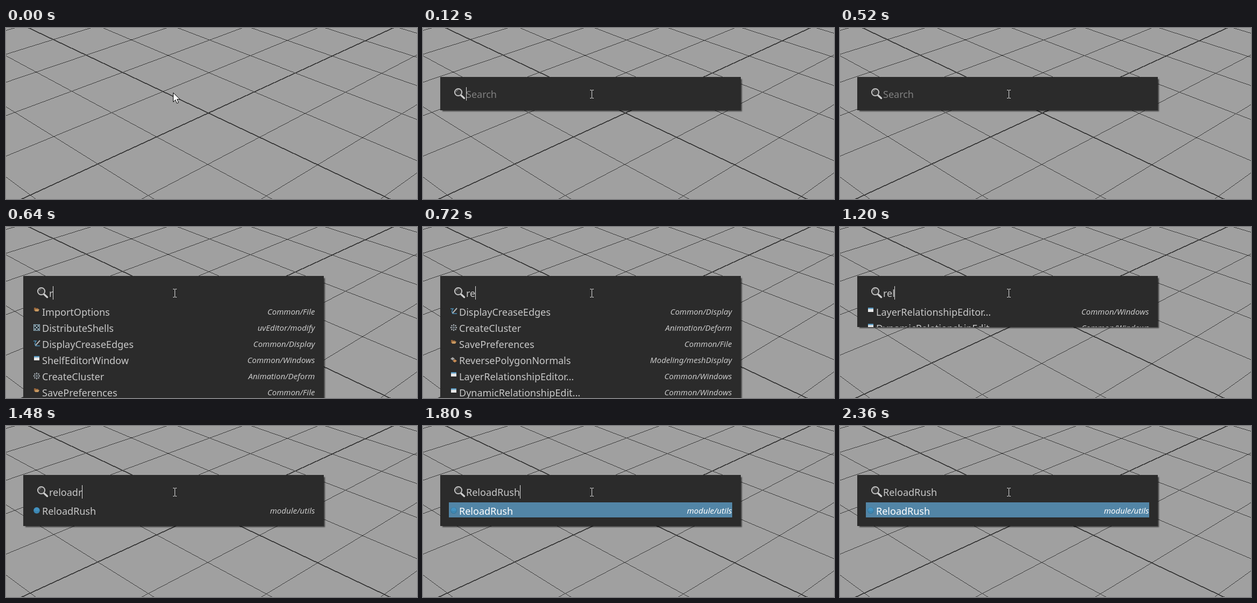
Write an HTML page that moves like this. It is 763x318 px and loops after 2400 ms.

```html
<!DOCTYPE html>
<html lang="en">
<head>
<meta charset="utf-8">
<title>Command search</title>
<style>
html, body { margin: 0; width: 100%; height: 100%; overflow: hidden; background: #a0a0a0; }
svg { position: absolute; left: 0; top: 0; display: block; }
#panel {
  position: absolute; left: 32px; top: 91px; width: 558px;
  background: #2b2b2b; box-shadow: 3px 3px 2px -1px rgba(0, 0, 0, .6);
}
#clip { position: absolute; inset: 0; overflow: hidden; }
text { font: 18px "Noto Sans", "Open Sans", sans-serif; fill: #c8c8c8; white-space: pre; }
text.path { font-size: 15px; font-style: italic; text-anchor: end; }
text.hint { fill: #808080; }
.on text { fill: #fff; }
.crisp { shape-rendering: crispEdges; }
</style>
</head>
<body>
<svg id="grid" class="crisp" width="763" height="318" fill="none"></svg>
<div id="panel"><div id="clip"><svg id="content" width="558" height="227" viewBox="32 91 558 227"></svg></div></div>
<svg id="pointer" width="763" height="318">
  <path id="arrow" d="M310.5 120.5v17l4-4 2.7 6.5 3-1.2-2.7-6.3h5.3z" fill="#fff" stroke="#000"/>
  <path id="beam" class="crisp" d="M310 115.5h3M314 115.5h3M313.5 116v14M310 130.5h3M314 130.5h3" stroke="#e0e0e0"/>
</svg>
<script>
const $ = id => document.getElementById(id);
const LOOP = 2400;

// Ground plane in perspective: world (u, v) to screen
function project(u, v) {
  const w = 1 - .06 * (u + v);
  const x = (376 + 66.7 * u - 112.9 * v) / w - .25;
  const y = (158 + 32.88 * u + 32.21 * v) / w + .16;
  return x.toFixed(2) + ' ' + y.toFixed(2);
}

function drawGrid() {
  const N = 6;
  let thin = '', axes = '';
  for (let i = -N; i <= N; i++) {
    const d = `M${project(i, -N)}L${project(i, N)}M${project(-N, i)}L${project(N, i)}`;
    if (i) thin += d; else axes += d;
  }
  // Widths give one and two pixels per column on the slanted lines
  $('grid').innerHTML =
    `<path d="${thin}" stroke="#333" stroke-width=".9"/><path d="${axes}" stroke="#383838" stroke-width="1.8"/>`;
}

// Row icons, drawn around the row's centre
const rect = (x, y, w, h, fill) => `<rect x="${x}" y="${y}" width="${w}" height="${h}" fill="${fill}"/>`;
const dot = (x, y, r, fill) => `<circle cx="${x}" cy="${y}" r="${r}" fill="${fill}"/>`;
const path = (d, attrs) => `<path d="${d}" ${attrs}/>`;

function ring() {
  let s = path('M-4 0H4M0-4V4', 'stroke="#8a97a0"');
  for (let i = 0; i < 8; i++) {
    const a = i * Math.PI / 4;
    s += dot((5 * Math.cos(a)).toFixed(1), (5 * Math.sin(a)).toFixed(1), 1.2, '#b4bcc2');
  }
  return s;
}

const icons = {
  folder: path('M-5-7h3l1 1h4v2l-1 3h-7z', 'fill="#94643a"') + path('M-3-4h8l-2 4h-6z', 'fill="#c99a62"'),
  shells: rect(-6, -6, 12, 12, '#9fc0d0') + rect(-5, -5, 10, 10, '#33424a') +
    [-3, 0, 3].map(x => [-3, 0, 3].map(y =>
      (x + y) % 2 ? '' : rect(x - 1, y - 1, 2, 2, '#d5e2e8')).join('')).join(''),
  crease: path('M-6-5h5q-4 5-1 9h8', 'fill="none" stroke="#4a8cb4" stroke-width="1.5"') +
    path('M6-6L-2 3', 'stroke="#b8b8b8" stroke-width="2"'),
  window: rect(-5, -7, 10, 8, '#e8e8e8') + rect(-5, -7, 10, 2.5, '#5b9cc4'),
  ring: ring(),
  flip: path('M-6-2l4-3 4 3-4 3z', 'fill="#a5a5a5"') + path('M-2 2l4-3 4 3-4 3z', 'fill="#c98d55"'),
  ball: dot(0, 0, 6, '#35789f') + dot(0, -.5, 5, '#4492c0') +
    path('M-4 1q4 3 8 0', 'fill="none" stroke="#35789f"')
};

const rows = {
  imp: ['folder', 'ImportOptions', 'Common/File'],
  dist: ['shells', 'DistributeShells', 'uvEditor/modify'],
  crease: ['crease', 'DisplayCreaseEdges', 'Common/Display'],
  shelf: ['window', 'ShelfEditorWindow', 'Common/Windows'],
  cluster: ['ring', 'CreateCluster', 'Animation/Deform'],
  prefs: ['folder', 'SavePreferences', 'Common/File'],
  normals: ['flip', 'ReversePolygonNormals', 'Modeling/meshDisplay'],
  layer: ['window', 'LayerRelationshipEditor...', 'Common/Windows'],
  dynamic: ['window', 'DynamicRelationshipEdit...', 'Common/Windows'],
  reload: ['ball', 'ReloadRush', 'module/utils']
};
const lists = {
  none: [],
  r: ['imp', 'dist', 'crease', 'shelf', 'cluster', 'prefs'],
  re: ['crease', 'cluster', 'prefs', 'normals', 'layer', 'dynamic'],
  rel: ['layer', 'dynamic', 'reload'],
  relo: ['reload']
};

// start, query, list, panel height, caret, highlight; the panel shrinks just before its text updates
const steps = [
  [0, '', 'none', 0, 0],
  [80, '', 'none', 62, 0],
  [120, '', 'none', 62, 1],
  [520, '', 'none', 62, 0],
  [640, 'r', 'r', 300, 1],
  [720, 're', 're', 300, 1],
  [1040, 're', 're', 167, 1],
  [1080, 'rel', 'rel', 167, 1],
  [1200, 'rel', 'rel', 95, 1],
  [1240, 'relo', 'relo', 95, 1],
  [1320, 'reloa', 'relo', 95, 1],
  [1400, 'reload', 'relo', 95, 1],
  [1480, 'reloadr', 'relo', 95, 1],
  [1800, 'ReloadRush', 'relo', 95, 1, 1],
  [2360, 'ReloadRush', 'relo', 95, 0, 1]
];

const lens = path('M71 125.5l5.5 5', 'stroke="#cfcfcf" stroke-width="3.4" stroke-linecap="round"') +
  '<circle cx="65.5" cy="119.5" r="6.6" fill="#383838" stroke="#c4c4c4" stroke-width="2"/>' +
  path('M61.5 119q.5-3.5 4-4', 'fill="none" stroke="#999"');

function row(key, i, on) {
  const [icon, label, group] = rows[key], y = 157 + 30 * i;
  return `<g class="${on ? 'on' : ''}">${on ? rect(48, y - 15, 526, 28, '#5285a6') : ''}` +
    `<g transform="translate(57 ${y})">${icons[icon]}</g>` +
    `<text x="67" y="${y + 8}">${label}</text><text class="path" x="573.5" y="${y + 6}">${group}</text></g>`;
}

function show([start, query, list, height, caret, on]) {
  $('panel').style.display = height ? 'block' : 'none';
  $('panel').style.height = height + 'px';
  $('arrow').style.display = start < 120 ? '' : 'none';
  $('beam').style.display = start < 120 ? 'none' : '';
  $('content').innerHTML = lens +
    `<text id="query" x="80" y="130" class="${query ? '' : 'hint'}">${query || 'Search'}</text>` +
    lists[list].map((key, i) => row(key, i, on)).join('');
  if (caret) {
    const x = Math.floor(80 + (query ? $('query').getComputedTextLength() : 0));
    $('content').innerHTML += rect(x, 110, 1, 25, '#e0e0e0');
  }
}

let current;
function tick() {
  const t = performance.now() % LOOP;
  const step = steps.findLast(s => s[0] <= t);
  if (step !== current) show(current = step);
  requestAnimationFrame(tick);
}

drawGrid();
tick();
</script>
</body>
</html>
```
